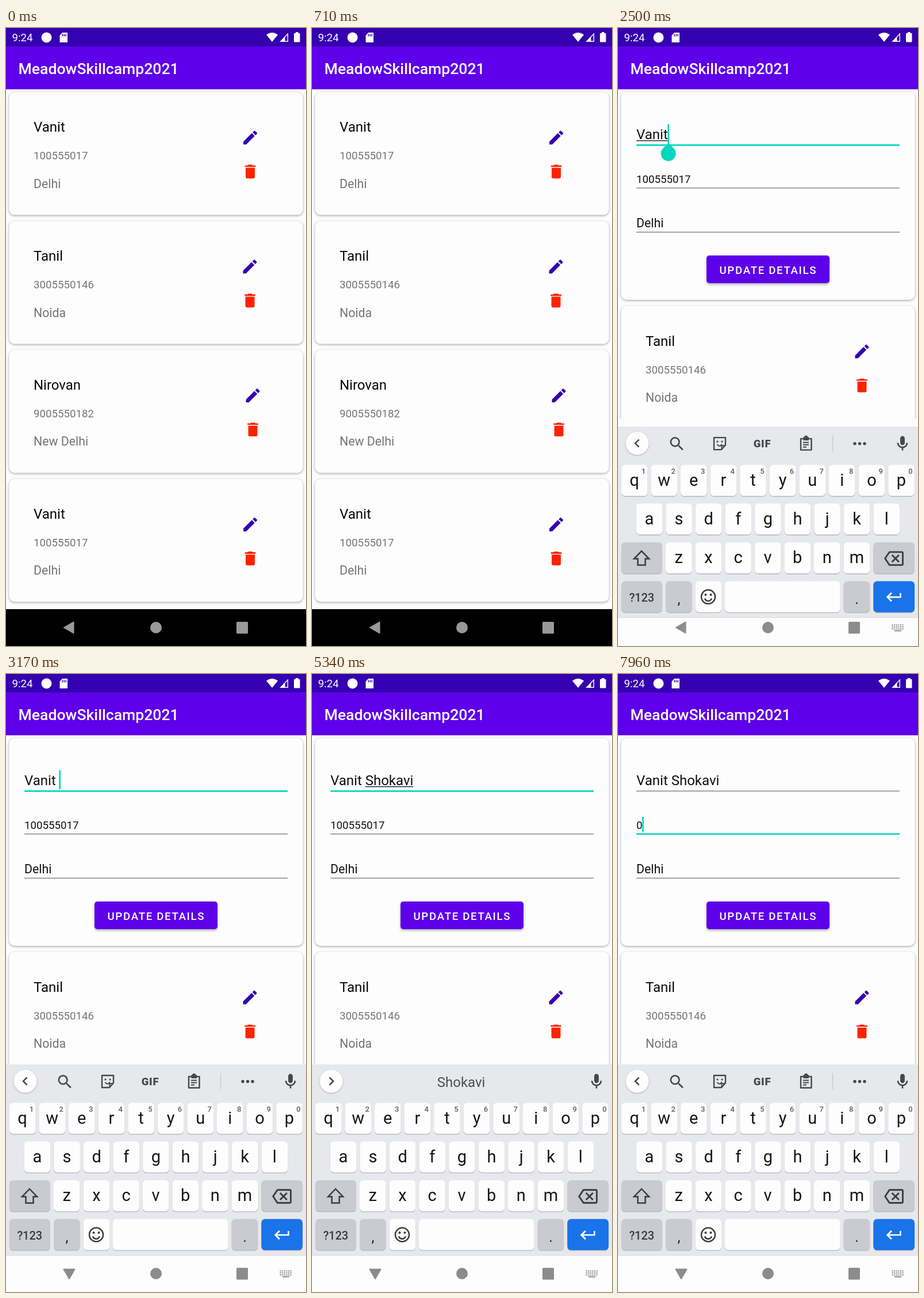
An HTML page with a canvas that plays this animation: 522 by 1073 pixels, repeating every 8 s.

```html
<!DOCTYPE html>
<html lang="en">
<head>
<meta charset="utf-8">
<title>Contact list</title>
<style>
html, body { margin: 0; width: 100%; height: 100%; overflow: hidden; background: #fdfdfd; }
canvas { display: block; width: 522px; height: 1073px; }
</style>
</head>
<body>
<canvas id="stage"></canvas>
<script>
const W = 522, H = 1073, LOOP = 8000;
const canvas = document.getElementById('stage');
const ctx = canvas.getContext('2d');
const dpr = window.devicePixelRatio || 1;
canvas.width = W * dpr;
canvas.height = H * dpr;

const PAGE = '#fdfdfd', PURPLE = '#5e00ea', DARK = '#3500b0', RED = '#ff2200', TEAL = '#03d6c1', INK = '#44474b';

const people = [
  { name: 'Vanit', phone: '100555017', city: 'Delhi', iconX: 425 },
  { name: 'Tanil', phone: '3005550146', city: 'Noida', iconX: 424.5 },
  { name: 'Nirovan', phone: '9005550182', city: 'New Delhi', iconX: 429.5 },
  { name: 'Vanit', phone: '100555017', city: 'Delhi', iconX: 425 }
];

const icons = {
  edit: 'M3 17.25V21h3.75L17.81 9.94l-3.75-3.75L3 17.25zM20.71 7.04a1 1 0 0 0 0-1.41l-2.34-2.34a1 1 0 0 0-1.41 0l-1.83 1.83 3.75 3.75 1.83-1.83z',
  trash: 'M6 19c0 1.1.9 2 2 2h8c1.1 0 2-.9 2-2V7H6v12zM19 4h-3.5l-1-1h-5l-1 1H5v2h14V4z',
  mic: 'M12 14c1.66 0 3-1.34 3-3V5c0-1.66-1.34-3-3-3S9 3.34 9 5v6c0 1.66 1.34 3 3 3zm5-3c0 2.76-2.24 5-5 5s-5-2.24-5-5H5c0 3.53 2.61 6.43 6 6.92V21h2v-3.08c3.39-.49 6-3.39 6-6.92h-2z',
  search: 'M15.5 14h-.79l-.28-.27A6.47 6.47 0 0 0 16 9.5 6.5 6.5 0 1 0 9.5 16c1.61 0 3.09-.59 4.23-1.57l.27.28v.79l5 4.99L20.49 19l-4.99-5zm-6 0C7.01 14 5 11.99 5 9.5S7.01 5 9.5 5 14 7.01 14 9.5 11.99 14 9.5 14z',
  erase: 'M22 3H7c-.69 0-1.23.35-1.59.88L0 12l5.41 8.11c.36.53.9.89 1.59.89h15c1.1 0 2-.9 2-2V5c0-1.1-.9-2-2-2zm0 16H7.07L2.4 12l4.66-7H22v14zm-11.59-2L14 13.41 17.59 17 19 15.59 15.41 12 19 8.41 17.59 7 14 10.59 10.41 7 9 8.41 12.59 12 9 15.59z',
  enter: 'M19 7v4H5.83l3.58-3.59L8 6l-6 6 6 6 1.41-1.41L5.83 13H21V7z'
};
for (const k in icons) icons[k] = new Path2D(icons[k]);

// Timeline in ms
const OPEN = 1000, FOCUS = 2300, KEYS_UP = 2350, FOCUS2 = 5750, ZERO = 7700;
const surname = ' Shokavi';
const typed = [3000, 3300, 3550, 3800, 4050, 4250, 4450, 4650];
const erased = [6450, ...Array.from({ length: 8 }, (_, i) => 6850 + i * 60)];
const edits = [FOCUS, ...typed, FOCUS2, ...erased, ZERO];
const hints = [
  [3380, ['S', 'She', 'So']],
  [3630, ['Sh', 'She', 'Should']],
  [3880, ['Sho', 'Show', 'Should']],
  [4130, ['', 'Shokavi', '']]
];

const clamp = v => Math.max(0, Math.min(1, v));
const easeOut = p => 1 - (1 - p) * (1 - p);
const countUntil = (times, t) => times.filter(x => x <= t).length;

function text(s, x, y, size, color, o = {}) {
  ctx.font = `${o.weight || 400} ${size}px Roboto, sans-serif`;
  ctx.textAlign = o.align || 'left';
  ctx.letterSpacing = (o.spacing || 0) + 'px';
  ctx.fillStyle = color;
  ctx.fillText(s, x, y);
  const w = ctx.measureText(s).width;
  ctx.letterSpacing = '0px';
  return w;
}

function rect(x, y, w, h, color) {
  ctx.fillStyle = color;
  ctx.fillRect(x, y, w, h);
}

function box(x, y, w, h, r, color) {
  ctx.beginPath();
  ctx.roundRect(x, y, w, h, r);
  ctx.fillStyle = color;
  ctx.fill();
}

function disc(x, y, r, color) {
  ctx.beginPath();
  ctx.arc(x, y, r, 0, Math.PI * 2);
  ctx.fillStyle = color;
  ctx.fill();
}

function poly(points, color) {
  ctx.beginPath();
  points.forEach(([x, y]) => ctx.lineTo(x, y));
  ctx.closePath();
  ctx.fillStyle = color;
  ctx.fill();
}

function line(points, color, width, closed) {
  ctx.beginPath();
  points.forEach(([x, y]) => ctx.lineTo(x, y));
  if (closed) ctx.closePath();
  ctx.strokeStyle = color;
  ctx.lineWidth = width;
  ctx.stroke();
}

function icon(name, cx, cy, color, scale = 1.33) {
  ctx.save();
  ctx.translate(cx, cy);
  ctx.scale(scale, scale);
  ctx.translate(-12, -12);
  ctx.fillStyle = color;
  ctx.fill(icons[name]);
  ctx.restore();
}

function shadowed(blur, dy, alpha, draw) {
  ctx.save();
  ctx.shadowColor = `rgba(0,0,0,${alpha})`;
  ctx.shadowBlur = blur * dpr;
  ctx.shadowOffsetY = dy * dpr;
  draw();
  ctx.restore();
}

function card(y, h) {
  shadowed(4, 1.3, 0.36, () => box(5.3, y, 511.4, h, 10, PAGE));
}

function contact(p, y) {
  text(p.name, 48, y + 69, 24, '#080808');
  text(p.phone, 48, y + 117, 18.7, '#757575');
  text(p.city, 48, y + 166.3, 21.3, '#757575');
  icon('edit', p.iconX, y + 79, DARK);
  icon('trash', p.iconX, y + 138, RED);
}

function field(s, size, base, rule, focused) {
  const w = text(s, 32, base, size, '#111');
  if (focused) rect(32, rule - 1.2, 458, 2.7, TEAL);
  else rect(32, rule - 0.6, 458, 1.3, '#777');
  return 32 + w;
}

function caret(x, top, bottom, on, handle) {
  if (on) rect(x - 0.4, top, 2.7, bottom - top, TEAL);
  if (!handle) return;
  ctx.save();
  ctx.translate(x + 0.9, bottom + 18);
  ctx.rotate(Math.PI / 4);
  box(-13, -13, 26, 26, [0, 13, 13, 13], TEAL);
  ctx.restore();
}

function form(t) {
  const first = t >= FOCUS && t < FOCUS2, second = t >= FOCUS2;
  const last = edits.filter(x => x <= t).pop() || 0;
  const on = (t - last) % 1000 < 500;

  const name = people[0].name + surname.slice(0, countUntil(typed, t));
  const nameEnd = field(name, 24, 193, 203.2, first);
  const phone = t >= ZERO ? '0' : people[0].phone.slice(0, 9 - countUntil(erased, t));
  const phoneEnd = field(phone, 18.7, 268.7, 277.7, second);
  field(people[0].city, 21.3, 345.7, 354.4, false);

  if (first && t >= KEYS_UP) underline(t);
  if (first) caret(nameEnd, 167, 200, on, t < typed[0]);
  if (second) caret(phoneEnd, 248, 274, on, t < erased[0]);

  shadowed(4, 2, 0.35, () => box(154, 395, 214, 48, 5, PURPLE));
  text('UPDATE DETAILS', 176.5, 426.5, 18.7, '#fff', { weight: 500, spacing: 1.66 });
}

// Marks the word being composed, a moment behind the typing
function underline(t) {
  const shown = surname.slice(0, countUntil(typed, t - 80));
  ctx.font = '400 24px Roboto, sans-serif';
  const width = s => ctx.measureText(s).width;
  const base = people[0].name;
  if (t < typed[0]) rect(32, 195, width(base), 1.3, '#111');
  else if (shown.length > 1) {
    const x = width(base + ' ');
    rect(32 + x, 195, width(base + shown) - x, 1.3, '#111');
  }
}

function list(t) {
  const p = clamp((t - OPEN) / 250), e = easeOut(p);
  const shift = 147.4 * e;
  card(111.3, 213.3 + shift);
  ctx.save();
  ctx.beginPath();
  ctx.rect(0, 106, W, 218.6 + shift);
  ctx.clip();
  if (p < 1) { ctx.globalAlpha = 1 - p; contact(people[0], 111.3); }
  if (p > 0) { ctx.globalAlpha = p; form(t); }
  ctx.restore();
  for (let i = 1; i < people.length; i++) {
    const y = 111.3 + 223.9 * i + shift;
    card(y, 213.3);
    contact(people[i], y);
  }
}

function header() {
  rect(0, 0, W, 32, DARK);
  rect(0, 32, W, 74.4, PURPLE);
  text('MeadowSkillcamp2021', 21.5, 79.7, 26.6, '#fff', { weight: 500 });
  text('9:24', 10.5, 23, 18.7, '#fff');
  disc(70.5, 16.5, 9, '#fff');
  poly([[98, 8], [107, 8], [107, 25], [93.5, 25], [93.5, 13]], '#fff');
  for (let i = 0; i < 3; i++) rect(97.5 + i * 3, 10.5, 1.5, 4, DARK);

  ctx.beginPath();
  ctx.moveTo(463, 24);
  ctx.lineTo(453, 11.8);
  ctx.quadraticCurveTo(463, 4.2, 473, 11.8);
  ctx.fillStyle = '#fff';
  ctx.fill();
  line([[478, 23.3], [490.3, 23.3], [490.3, 10.3]], '#fff', 1.4, true);
  poly([[476.5, 24], [485.5, 24], [485.5, 14.8]], '#fff');
  box(501, 9, 10.5, 15.5, 1.2, '#fff');
  rect(504, 7, 4.5, 3, '#fff');
}

function nav(t) {
  const light = t >= KEYS_UP;
  const gray = light ? '#8c8c8c' : '#999';
  if (!light) rect(0, 1009, W, 64, '#000');
  const turn = easeOut(clamp((t - 2505) / 160));
  ctx.save();
  ctx.translate(110, 1041);
  ctx.rotate(-turn * Math.PI / 2);
  ctx.lineJoin = 'round';
  const tri = [[-9, 0], [7.5, -9.5], [7.5, 9.5]];
  poly(tri, gray);
  line(tri, gray, 2, true);
  ctx.restore();
  disc(261, 1041, 10, gray);
  box(401, 1031, 20, 20.5, 1.5, gray);
  if (light) {
    for (let r = 0; r < 3; r++)
      for (let c = 0; c < 6; c++) rect(476.5 + c * 3.6, 1035.5 + r * 3.4, 2.2, 2, gray);
    rect(481, 1045.5, 12, 2, gray);
  }
}

function key(x, y, w, color) {
  box(x, y + 1.3, w, 54, 6.5, '#b4b6bc');
  box(x, y, w, 54, 6.5, color || PAGE);
}

function letters(row, x, y) {
  [...row].forEach((ch, i) => {
    const left = x + i * 51.6;
    key(left, y, 45.6);
    text(ch, left + 22.8, y + 36, 29, '#151515', { align: 'center' });
  });
}

function toolbar() {
  icon('search', 102.5, 708, INK);
  ctx.lineJoin = 'round';
  line([[167, 697], [187, 697], [187, 710], [180, 718], [167, 718]], INK, 2.4, true);
  line([[187, 711], [180.5, 711], [180.5, 717]], INK, 2);
  disc(173, 704, 1.6, INK);
  disc(181, 704, 1.6, INK);
  ctx.beginPath();
  ctx.arc(176.5, 707.5, 4, 0.2, Math.PI - 0.3);
  ctx.stroke();
  text('GIF', 251, 714, 18.5, INK, { weight: 900, align: 'center', spacing: 0.8 });
  ctx.strokeStyle = INK;
  ctx.lineWidth = 2.4;
  ctx.strokeRect(318, 699, 18.5, 19.5);
  rect(322.5, 696, 9.5, 6, INK);
  disc(327.2, 696.5, 3, INK);
  [10, 9.999, 6].forEach((w, i) => rect(322, 704.5 + i * 4, w, 2, INK));
  rect(373, 693, 1.2, 28, '#c4c6cb');
  [412, 420.5, 429].forEach(x => disc(x, 707.5, 2.7, INK));
}

function suggestions(words) {
  const many = words[0] !== '';
  words.forEach((w, i) => text(w, 117 + i * 142.6, 717, 24, '#4b4d52', { align: 'center' }));
  if (many) [184, 335].forEach(x => rect(x, 691, 1.2, 32, '#c0c2c8'));
}

function keyboard(t) {
  const p = clamp((t - KEYS_UP) / 250);
  if (t < KEYS_UP) return;
  rect(0, 678, W, 395, PAGE);
  ctx.save();
  ctx.globalAlpha = clamp((t - KEYS_UP) / 80);
  ctx.translate(0, 88 * (1 - easeOut(p)));

  rect(0, 678, W, 332, '#e6e8ec');
  rect(0, 1009, W, 1.3, '#dcdee2');
  rect(0, 1010.3, W, 64, PAGE);

  const hint = t < FOCUS2 && hints.filter(h => h[0] <= t).pop();
  shadowed(3, 1, 0.25, () => disc(33.5, 707, 20, PAGE));
  const d = hint ? 1 : -1;
  line([[33.5 - d * 3, 700.5], [33.5 + d * 3.5, 707], [33.5 - d * 3, 713.5]], INK, 2.5);
  if (hint) suggestions(hint[1]);
  else toolbar();
  icon('mic', 495, 707.5, INK, 1.32);

  const gray = '#c9cbd1';
  letters('qwertyuiop', 5.8, 744.5);
  for (let i = 0; i < 10; i++)
    text(String((i + 1) % 10), 44.5 + i * 51.6, 759.5, 13, '#5c5e62', { weight: 500, align: 'center' });
  letters('asdfghjkl', 31.7, 811.5);
  letters('zxcvbnm', 83, 879);

  key(5.8, 879, 71.2, gray);
  key(444.3, 879, 71.8, gray);
  key(5.8, 946.3, 71.2, gray);
  key(83, 946.3, 45.6, gray);
  key(134.6, 946.3, 45.6);
  key(186, 946.3, 200.6);
  key(392.6, 946.3, 45.6, gray);
  key(444.3, 946.3, 71.8, '#1a73e8');

  ctx.lineJoin = 'miter';
  line([[41, 894], [54, 907.5], [47.5, 907.5], [47.5, 918.5], [34.5, 918.5], [34.5, 907.5], [28, 907.5]], '#3a3c40', 2.5, true);
  icon('erase', 480, 907, '#3a3c40', 1.41);
  text('?123', 41.3, 981.5, 20, '#393b3f', { weight: 500, align: 'center' });
  text(',', 106, 986, 25, '#222', { align: 'center' });
  text('.', 415.5, 986, 25, '#222', { align: 'center' });
  icon('enter', 480.5, 974, '#fff', 1.37);

  ctx.strokeStyle = '#3a3c40';
  ctx.lineWidth = 2.5;
  ctx.beginPath();
  ctx.arc(157, 973.5, 12, 0, Math.PI * 2);
  ctx.stroke();
  disc(152.5, 970, 2, '#3a3c40');
  disc(161.5, 970, 2, '#3a3c40');
  ctx.beginPath();
  ctx.arc(157, 974.5, 6.3, 0.3, Math.PI - 0.3);
  ctx.stroke();
  ctx.restore();
}

function draw(t) {
  ctx.setTransform(dpr, 0, 0, dpr, 0, 0);
  rect(0, 0, W, H, PAGE);
  list(t);
  header();
  keyboard(t);
  nav(t);
}

let start;
function tick(now) {
  if (start === undefined) start = now;
  draw((now - start) % LOOP);
  requestAnimationFrame(tick);
}
draw(0);
requestAnimationFrame(tick);
</script>
</body>
</html>
```
